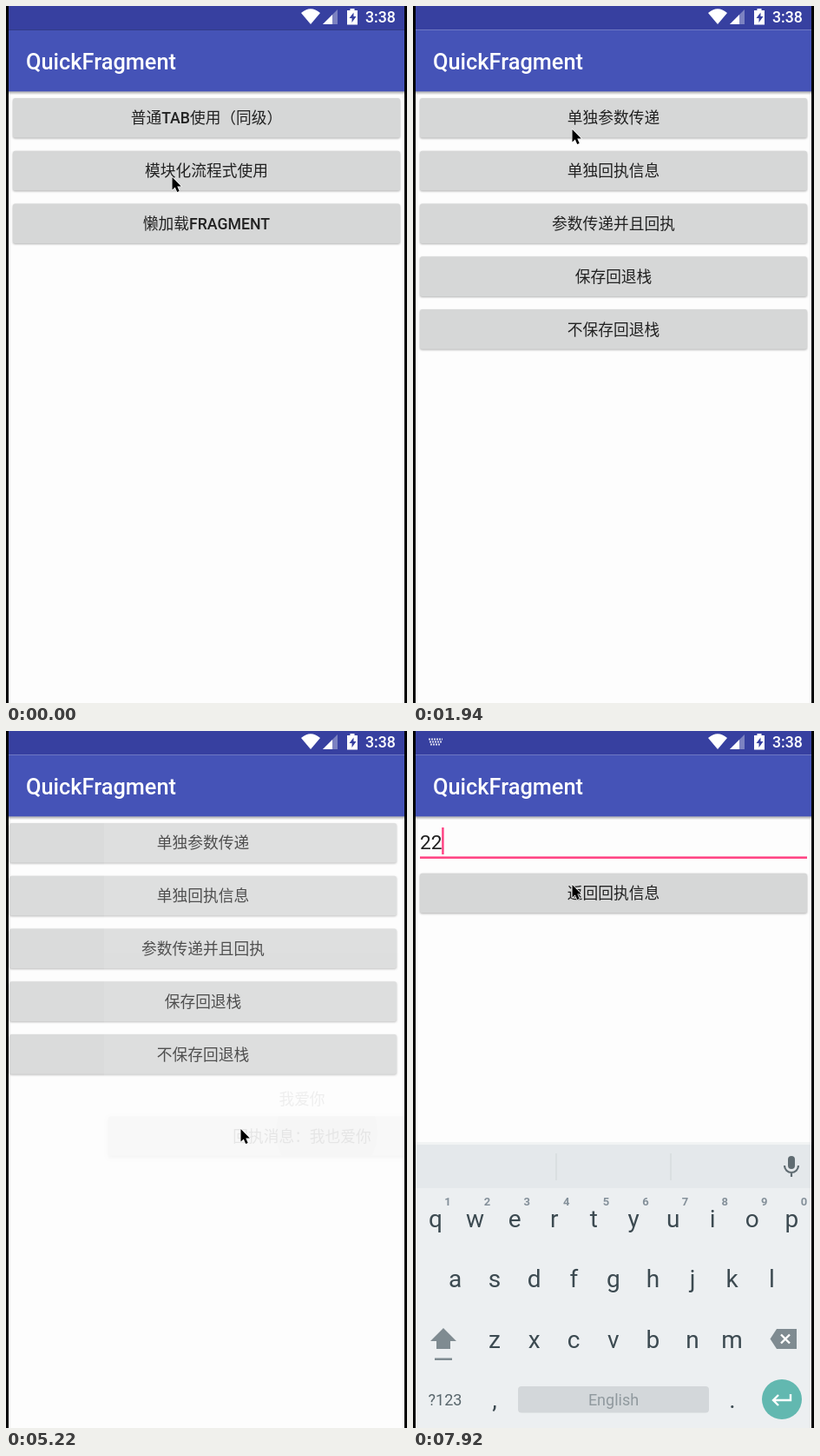
These frames come from a looping animation (462 by 802 pixels, 8 s). An HTML page:

```html
<!DOCTYPE html>
<html lang="zh-CN">
<head>
<meta charset="utf-8">
<title>QuickFragment</title>
<style>
  html, body { margin: 0; width: 100%; height: 100%; overflow: hidden; background: #000; }
  svg { display: block; }
  text { font-family: Roboto, "Noto Sans CJK SC", "Noto Sans CJK", sans-serif; }
  .mid { text-anchor: middle; }
  .med { font-weight: 500; }
  .face { fill: #d6d7d7; filter: drop-shadow(0 1px 1px rgba(0,0,0,.3)); }
  .down .face { filter: drop-shadow(0 2.5px 2px rgba(0,0,0,.32)); }
  .ripple { visibility: hidden; }
  .down .ripple { visibility: visible; }
</style>
</head>
<body>
<svg id="stage" width="462" height="802" viewBox="0 0 462 802"></svg>
<script>
const DP = 456 / 360, PAPER = '#fdfdfd', PINK = '#ff4081';
const rect = (x, y, w, h, fill, more = '') =>
  `<rect x="${x}" y="${y}" width="${w}" height="${h}" fill="${fill}" ${more}/>`;
const text = (x, y, size, fill, str, more = '') =>
  `<text x="${x}" y="${y}" font-size="${size}" fill="${fill}" ${more}>${str}</text>`;

function button(id, y, label) {
  const h = 36 * DP, str = label.replace(/[A-Z]+/g, '<tspan class="med">$&</tspan>');
  return `<g id="${id}">
    <rect class="face" x="8" y="${y}" width="446" height="${h}" rx="2.5"/>
    <svg class="ripple" x="8" y="${y}" width="446" height="${h}">
      ${rect(0, 0, 446, h, '#000', 'opacity=".04" rx="2.5"')}
      <circle fill="#000" opacity=".08"/></svg>
    ${text(231, y + h / 2 + 6.6, 14 * DP, '#212121', str, 'class="mid"')}</g>`;
}
const rows = (name, labels) =>
  labels.map((s, i) => button(name + i, 105.9 + 48 * DP * i, s)).join('');
const page = (id, body) => `<g id="${id}">${rect(3, 98, 456, 704, PAPER)}${body}</g>`;
const bar = id => `<g id="${id}">
  ${rect(3, 0, 456, 27.4, '#3740a0')}${rect(3, 27.4, 456, 71, '#4553b7')}
  ${rect(3, 98.4, 456, 4, 'url(#shade)')}
  ${text(23, 73, 20 * DP, '#fff', 'QuickFragment', 'class="med"')}</g>`;

function statusIcons() {
  return `<g fill="#fff">
    <path d="M351 21 340 8Q351 -1.5 362 8Z"/>
    <path d="M365 21 382 4V21Z" opacity=".35"/><path d="M365 21 376 10V21Z"/>
    <path d="M396.5 5V3h5v2h3.5v16.5h-12V5Z"/>
    <path d="M400.5 7.5 395.5 14h3v5l5-7h-3Z" fill="#3740a0"/>
    ${text(414, 19, 14 * DP, '#fff', '3:38', 'class="med"')}</g>`;
}

function keyboard() {
  const key = (x, y, s) => text(x, y, 28, '#3c4a51', s, 'class="mid"');
  const line = (str, x, y) => [...str].map((c, i) => key(x + 45.6 * i, y, c)).join('');
  const nums = [...'1234567890'].map((c, i) =>
    text(40 + 45.6 * i, 546, 13, '#84909a', c, 'class="mid" font-weight="700"')).join('');
  const dots = [0, 1, 2].map(r =>
    `<path d="M${18 + r} ${9.5 + 3 * r}H${34 - r}" stroke="#fff" stroke-width="2" stroke-dasharray="2 1" opacity=".8"/>`).join('');
  return `<g id="keys">${dots}
    ${rect(3, 473, 456, 3, '#f1f3f4')}${rect(3, 476, 456, 50, '#e4e8eb')}
    ${rect(3, 526, 456, 276, '#eceff1')}
    ${rect(164.5, 486, 1, 31, '#cfd5d8')}${rect(296.5, 486, 1, 31, '#cfd5d8')}
    ${rect(432, 489, 8, 15, '#606c72', 'rx="4"')}
    <path d="M428 500a8 8 0 0 0 16 0M436 508v5" fill="none" stroke="#606c72" stroke-width="2.2"/>
    ${line('qwertyuiop', 26, 571)}${nums}${line('asdfghjkl', 48.5, 640)}${line('zxcvbnm', 94, 710)}
    <path d="M35 687 50 702H43V711H27V702H20Z" fill="#7f8b91"/>${rect(25, 721.5, 20, 2.5, '#7f8b91')}
    <path d="M411.5 699.500 419 688H442V711H419Z" fill="#7f8b91"/>
    <path d="M424 694.500l10 10m0-10l-10 10" stroke="#fff" stroke-width="2.4"/>
    ${text(37, 775.5, 18, '#59666c', '?123', 'class="mid"')}
    ${key(94, 779, ',')}${key(368, 779, '.')}
    ${rect(121, 754, 220, 30.5, '#d3d7da', 'rx="4"')}
    ${text(231, 775.5, 18, '#90999e', 'English', 'class="mid"')}
    <circle cx="425" cy="769" r="23" fill="#62b8b0"/>
    <path d="M435 763v7H415m6-6-6 6 6 6" fill="none" stroke="#fff" stroke-width="2.4"/></g>`;
}

document.getElementById('stage').innerHTML = `
  <defs><clipPath id="screen">${rect(3, 0, 456, 802, '#000')}</clipPath>
  <linearGradient id="shade" x2="0" y2="1"><stop stop-opacity=".32"/><stop offset="1" stop-opacity="0"/></linearGradient></defs>
  <g clip-path="url(#screen)">
    ${page('home', rows('home', ['普通TAB使用（同级）', '模块化流程式使用', '懒加载FRAGMENT']))}
    ${bar('homeBar')}
    <g id="flow">
      ${rect(3, 27, 456, 775, PAPER, 'id="paper"')}
      ${page('list', rows('list', ['单独参数传递', '单独回执信息', '参数传递并且回执', '保存回退栈', '不保存回退栈']))}
      ${page('msg', text(231, 430, 14 * DP, '#757575', '我爱你', 'class="mid"') + button('reply', 443.2, '回执消息：我也爱你'))}
      ${page('edit', text(8, 135.5, 18 * DP, '#aaa', '', 'id="field"') +
        rect(8, 144.4, 446, 1.3, '#8a8a8a', 'id="under"') +
        rect(8, 111, 2.4, 31, PINK, 'id="caret"') + button('back', 163.7, '返回回执信息'))}
      ${bar('flowBar')}
    </g>
    ${keyboard()}${statusIcons()}
    <path id="mouse" d="M0 0V14.500L3.300 11.500 5.700 17 8.200 16 5.800 10.500H10.300Z" stroke="#fff" stroke-width="1.2" paint-order="stroke"/>
  </g>`;

const $ = id => document.getElementById(id);
const LOOP = 8000;

// Moments at which the screen refreshes
const run = (from, n) => Array.from({ length: n }, (_, i) => from + 150 * i);
const ticks = [0, 440, 740, ...run(1190, 6), ...run(2830, 7), 3870, 4020, 4620,
  ...run(5220, 6), 6270, ...run(6570, 7), ...run(7620, 3)];

// Page states: [x, opacity]
const scenes = [
  [0, { flow: [0, 0, 0], list: [0, 0], msg: [0, 0], edit: [0, 0], focus: 0, typed: '', keys: 0 }],
  [1190, { flow: [40, .3, .3] }],
  [1340, { flow: [12, .82, .97], list: [30, .75] }],
  [1490, { flow: [0, 1, 1], list: [0, 1] }],
  [2830, { list: [-25, .88], msg: [102, .15] }],
  [2980, { list: [-97, .3], msg: [30, .75] }],
  [3130, { list: [-114, 0], msg: [0, 1] }],
  [5220, { list: [-4, .88], msg: [110, .1] }],
  [5370, { list: [0, 1], msg: [114, 0] }],
  [6570, { list: [-25, .88], edit: [102, .18] }],
  [6720, { list: [-97, .3], edit: [30, .75] }],
  [6870, { list: [-114, 0], edit: [0, 1] }],
  [7470, { focus: 1 }],
  [7620, { keys: 1 }],
  [7770, { typed: '2' }],
  [7920, { typed: '22' }]
];

// Touches: button, start, end, x, y
const touches = [
  ['home1', 740, 1340, 190, 196], ['list0', 2830, 2980, 183, 142],
  ['reply', 4620, 5370, 270, 457], ['list1', 6270, 6720, 216, 203]
];

// Pointer path: time, x, y
const path = [
  [0, 191.500, 197], [439, 191.500, 197], [440, 190.500, 197], [1490, 190.500, 197], [1940, 183.500, 142],
  [3280, 183.500, 142], [3870, 268.500, 457], [4020, 270.500, 458], [5370, 270.500, 458],
  [5970, 216.500, 204], [6870, 216.500, 204], [7320, 184, 132], [7620, 184, 132], [7920, 183.500, 177]
];

function pointer(t) {
  const i = path.findIndex(p => p[0] >= t);
  if (i < 1) return i ? path[path.length - 1].slice(1) : path[0].slice(1);
  const [a, b] = [path[i - 1], path[i]], k = (t - a[0]) / (b[0] - a[0]);
  return [1, 2].map(n => a[n] + (b[n] - a[n]) * k);
}

function touch(t, [id, start, end, x, y]) {
  const on = t >= start && t < end, el = $(id);
  el.classList.toggle('down', on);
  if (!on) return;
  const dot = el.querySelector('circle'), top = +el.querySelector('.face').getAttribute('y');
  dot.setAttribute('cx', x - 8 + (231 - x) * .27);
  dot.setAttribute('cy', (y - top + 22.8) / 2);
  dot.setAttribute('r', 20 + (t - start) * .064);
}

function place(id, x, y, alpha) {
  const el = $(id);
  el.setAttribute('transform', `translate(${x} ${y})`);
  el.setAttribute('opacity', alpha);
}

function draw(now) {
  const t = ticks.filter(s => s <= now).pop();
  const s = Object.assign({}, ...scenes.filter(r => r[0] <= t).map(r => r[1]));
  place('flow', 0, s.flow[0], 1);
  $('paper').setAttribute('opacity', s.flow[1]);
  $('flowBar').setAttribute('opacity', s.flow[2]);
  for (const id of ['list', 'msg', 'edit']) place(id, s[id][0], 0, s[id][1]);
  $('keys').setAttribute('opacity', s.keys);

  const field = $('field'), under = $('under');
  field.textContent = s.typed || '输入回执信息';
  field.setAttribute('fill', s.typed ? '#212121' : '#aaa');
  under.setAttribute('fill', s.focus ? PINK : '#8a8a8a');
  under.setAttribute('height', s.focus ? 2.5 : 1.3);
  $('caret').setAttribute('opacity', s.focus);
  $('caret').setAttribute('x', 8 + s.typed.length * 12.6);

  touches.forEach(p => touch(t, p));
  place('mouse', ...pointer(t), 1);
}

const begin = performance.now();
function frame() {
  draw((performance.now() - begin) % LOOP);
  requestAnimationFrame(frame);
}
frame();
</script>
</body>
</html>
```
